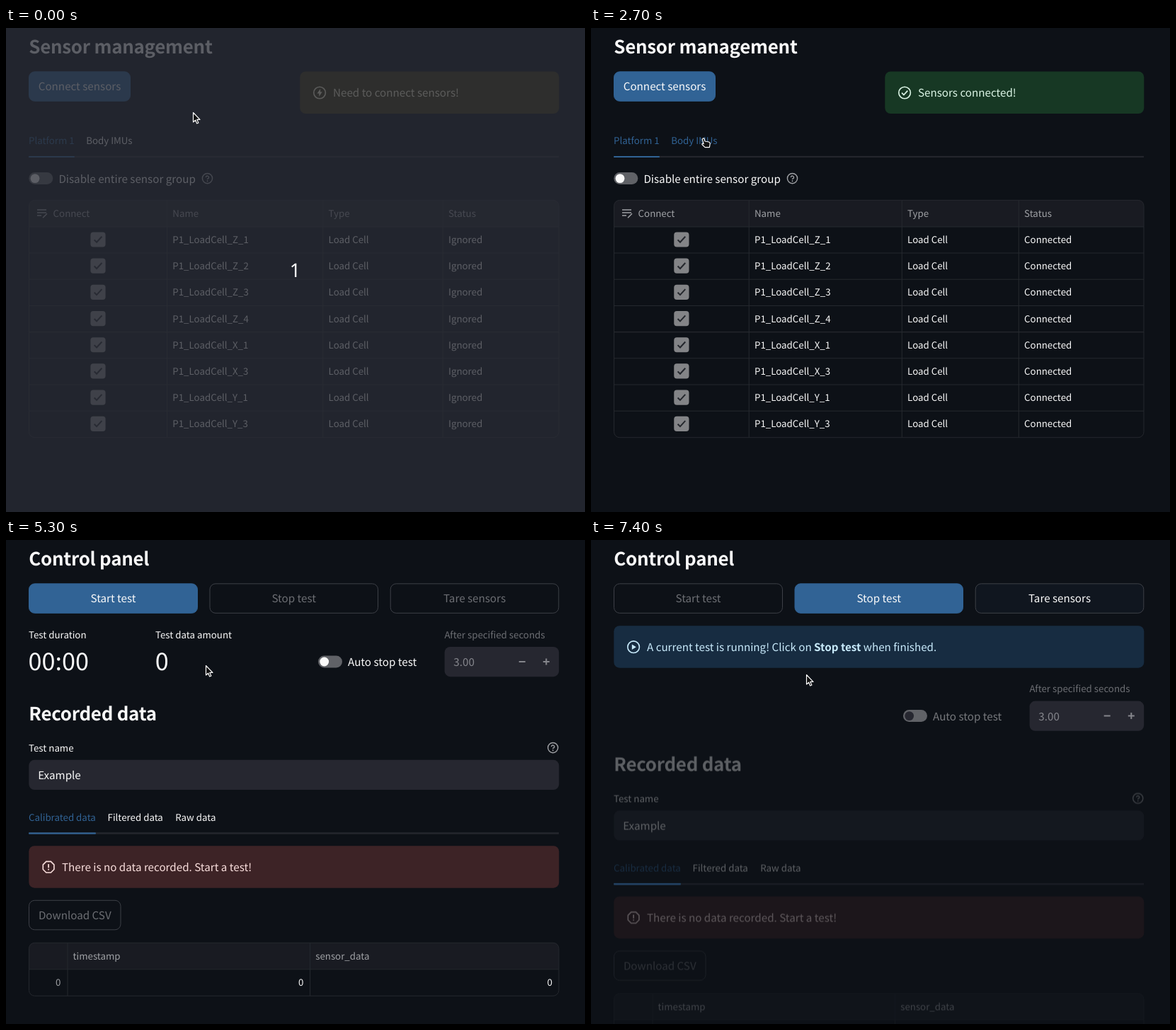
These frames come from a looping animation (818x684 px, 8 s). An HTML page:

```html
<!DOCTYPE html>
<html lang="en">
<head>
<meta charset="utf-8">
<title>Sensor management</title>
<style>
html, body { margin: 0; width: 100%; height: 100%; overflow: hidden; background: #0d1117; }
svg { display: block; width: 818px; height: 684px; }
text {
  font-family: "Noto Sans CJK JP", "Noto Sans CJK SC", "Noto Sans CJK", "Noto Sans", sans-serif;
  text-rendering: geometricPrecision;
  white-space: pre;
}
</style>
</head>
<body>
<svg id="stage" viewBox="0 0 818 684"></svg>
<script>
const LOOP = 8000, STEP = 100;
const BODY = 15.2, SMALL = 13.3;
const BG = '#0d1117', WHITE = '#fafafa', BLUE = '#316395', BLUE_HOVER = '#29547f';
const GREY = '#9fa1a5', DIM = '#6c6e73', LINE = '#25282e', EDGE = '#3d4047', FIELD = '#262730';

const text = (x, y, s, { size = BODY, fill = WHITE, anchor = 'start', more = '' } = {}) =>
  `<text x="${x}" y="${y}" font-size="${size}" fill="${fill}" text-anchor="${anchor}" ${more}>${s}</text>`;
const small = (x, y, s, fill = WHITE, anchor) => text(x, y, s, { size: SMALL, fill, anchor });
const box = (x, y, w, h, fill, { r = 8, stroke = 'none', id = '' } = {}) =>
  `<rect ${id && `id="${id}"`} x="${x}" y="${y}" width="${w}" height="${h}" rx="${r}" fill="${fill}" stroke="${stroke}"/>`;
const path = (d, color, width = 1.5) =>
  `<path d="${d}" fill="none" stroke="${color}" stroke-width="${width}"/>`;
const group = (id, body, attrs = '') => `<g id="${id}" ${attrs}>${body}</g>`;
const at = (x, y, body) => `<g transform="translate(${x} ${y})">${body}</g>`;

const heading = (y, s) =>
  text(32.3, y, s, { size: 25.9, more: 'font-weight="700" letter-spacing="-0.26"' });

function button(x, w, y, label, style = 'primary', id) {
  const [fill, stroke, color] = {
    primary: [BLUE, BLUE, WHITE],
    plain: ['#10161f', EDGE, WHITE],
    disabled: ['none', EDGE, DIM],
  }[style];
  return box(x + .5, y + .5, w - 1, 41.5, fill, { stroke, id }) +
    text(x + w / 2, y + 27, label, { fill: color, anchor: 'middle' });
}

const help = (x, y, color = GREY) => `<g transform="translate(${x} ${y}) scale(.708) translate(-12 -12)">
  <circle cx="12" cy="12" r="10" fill="none" stroke="${color}" stroke-width="2"/>
  <path d="M9.09 9a3 3 0 0 1 5.83 1c0 2-3 3-3 3M12 16.5v1.2" fill="none" stroke="${color}" stroke-width="2" stroke-linecap="round"/></g>`;

const toggle = (x, y, knob = WHITE) =>
  box(x, y - 8.5, 34, 17, '#606267', { r: 8.5 }) +
  `<circle cx="${x + 8.7}" cy="${y}" r="6.4" fill="${knob}"/>`;

const ring = c => `<circle r="8.3" fill="none" stroke="${c}" stroke-width="1.6"/>`;
const icons = {
  bolt: c => ring(c) + `<path d="M1 -5.5L-3.6 1H-.8V5.5L3.6 -1.3H1Z" fill="${c}"/>`,
  check: c => ring(c) + path('M-4 .2L-1.2 3L4.2 -2.8', c, 1.7),
  play: c => ring(c) + `<path d="M-2.3 -3.8V3.8L3.7 0Z" fill="${c}"/>`,
  error: c => path('M-3.3 -7.8H3.3L7.8 -3.3V3.3L3.3 7.8H-3.3L-7.8 3.3V-3.3Z', c, 1.6) +
    path('M0 -4.3V1M0 2.6V4.4', c, 1.7),
};
const alertBox = (x, y, w, icon, fill, color, label) =>
  box(x, y, w, 59.5, fill) + at(x + 27.8, y + 30, icons[icon](color)) +
  text(x + 46.7, y + 35.8, label, { fill: color });

function tabs(y, items, active, end, id) {
  return items.map(([x, label], i) =>
    `<g ${id ? `id="${id}${i}"` : ''} fill="${i ? WHITE : BLUE}">${text(x, y, label, { size: SMALL, fill: 'inherit' }).replace('fill="inherit"', '')}</g>`
  ).join('') + box(32, y + 16.6, 749, 2.1, '#24262d', { r: 0 }) +
    box(active, y + 16.6, end - active, 2.1, BLUE, { r: 1, id: id && id + 'Line' });
}

const ROW = 37.19;
function tableFrame(y, rows, cols) {
  const bottom = y + ROW * (rows + 1) + .6;
  let d = '';
  for (let i = 1; i <= rows; i++) d += `M32.5 ${y + .3 + i * ROW}H781`;
  for (const x of cols) d += `M${x} ${y}V${bottom}`;
  return `<path d="M32.5 ${y + ROW}V${y + 8}q0 -8 8 -8H773q8 0 8 8V${y + ROW}Z" fill="#191b22"/>` +
    path(d, LINE, 1.06) + box(32.5, y, 748.5, bottom - y, 'none', { stroke: LINE });
}

function sensorTable(id, cols, names, type, status) {
  const y = 243.4, xs = cols.map(x => x + 7.8), mid = (32.5 + cols[0]) / 2;
  let out = tableFrame(y, names.length, cols) +
    path('M44 257H57M44 261H57M44 265H50M52 268.3L58 262.3', GREY, 1.5) +
    small(66.6, 266.6, 'Connect', GREY);
  ['Name', 'Type', 'Status'].forEach((s, i) => out += small(xs[i], 266.6, s, GREY));
  names.forEach((name, i) => {
    const cy = y + ROW * (i + 1.5);
    out += box(mid - 10.6, cy - 10.8, 21.2, 21.2, '#838487', { r: 4 }) +
      at(mid, cy, path('M-5.3 .2L-1.9 3.6L5.4 -4.4', '#24272d', 2));
    [name, type, status].forEach((s, j) => out += small(xs[j], cy + 4.8, s));
  });
  return group(id, out);
}

const cells = ['Z_1', 'Z_2', 'Z_3', 'Z_4', 'X_1', 'X_3', 'Y_1', 'Y_3'].map(s => 'P1_LoadCell_' + s);

const sensorPage = group('sensorPage',
  heading(36, 'Sensor management') +
  button(32, 144, 61.3, 'Connect sensors', 'primary', 'connectBtn') +
  group('needAlert', alertBox(415.3, 61.5, 366, 'bolt', '#3c3615', '#f8efcf', 'Need to connect sensors!')) +
  group('doneAlert', alertBox(415.3, 61.5, 366, 'check', '#173824', '#dcf5e6', 'Sensors connected!')) +
  tabs(164.3, [[32, 'Platform 1'], [113.2, 'Body IMUs']], 32, 97, 'tab') +
  toggle(32.3, 212.6) + text(74.4, 218.6, 'Disable entire sensor group') + help(284.5, 212.6) +
  sensorTable('ignoredTable', [227.5, 447.8, 617.2], cells, 'Load Cell', 'Ignored') +
  sensorTable('connectedTable', [223.2, 439.3, 604.3], cells, 'Load Cell', 'Connected') +
  sensorTable('imuTable', [223.2, 439.3, 604.3], ['Body_IMU_1', 'Body_IMU_2'], 'IMU', 'Connected'));

const dataTable = tableFrame(569.3, 1, [87, 429.6]) +
  small(94.6, 592.5, 'timestamp', GREY) + small(437.2, 592.5, 'sensor_data', GREY) +
  small(77.4, 630.4, '0', GREY, 'end') + small(420.4, 630.4, '0', WHITE, 'end') +
  small(771.8, 630.4, '0', WHITE, 'end');

const controlPage = group('controlPage',
  heading(36, 'Control panel') +
  group('idle',
    button(32, 239, 61.3, 'Start test', 'primary', 'startBtn') +
    button(287.5, 238.5, 61.3, 'Stop test', 'disabled') +
    button(542.7, 238.6, 61.3, 'Tare sensors', 'disabled') +
    small(32, 138.7, 'Test duration') + small(211, 138.7, 'Test data amount') +
    text(31.6, 184.4, '00:00', { size: 34.2 }) + text(210.8, 184.4, '0', { size: 34.2 })) +
  group('running',
    button(32, 239, 61.3, 'Start test', 'disabled') +
    button(287.5, 238.5, 61.3, 'Stop test') +
    button(542.7, 238.6, 61.3, 'Tare sensors', 'plain') +
    group('runAlert', alertBox(32.3, 121.2, 749, 'play', '#172c41', '#c9ebfc',
      'A current test is running! Click on <tspan font-weight="700">Stop test</tspan> when finished.'))) +
  group('autoStop',
    group('toggleOn', toggle(441, 172) + text(483, 178, 'Auto stop test')) +
    group('toggleOff', toggle(441, 172, FIELD) + text(483, 178, 'Auto stop test', { fill: '#76787c' })) +
    small(619.4, 138.5, 'After specified seconds', DIM) +
    box(619.6, 151, 161.6, 42.2, FIELD) + text(632.3, 178, '3.00', { fill: '#85868c' }) +
    path('M724.7 172H733.7M758.8 172H767.8M763.3 167.5V176.5', '#85868c', 2)) +
  group('recorded',
    group('stale',
      heading(255.4, 'Recorded data') +
      small(32, 298.8, 'Test name') + help(772.7, 293.6) +
      box(32.3, 310.8, 749, 42.2, FIELD) + text(45.2, 338, 'Example') +
      tabs(396.8, [[32, 'Calibrated data'], [143.6, 'Filtered data'], [239.2, 'Raw data']], 32, 127) +
      alertBox(32.3, 432.2, 749, 'error', '#3d2326', '#fadfdd', 'There is no data recorded. Start a test!') +
      button(32, 130.5, 508.8, 'Download CSV', 'disabled') + dataTable) +
    group('tabRule', box(32, 413.4, 749, 2.1, '#24262d', { r: 0 }) + box(32, 413.4, 95, 2.1, BLUE, { r: 1 }))));

const shape = (d, more = '') => `<path d="${d}" fill="#111" stroke="#fff" stroke-width="1.15" stroke-linejoin="round" ${more}/>`;
const pointer = group('pointer',
  group('arrow', shape('M.5 .5V14L3.6 11.2L5.7 16L7.9 15L5.8 10.4H10Z')) +
  group('hand', shape('M1.2 2.2Q2.6 -.2 4.2 1.8L4.8 5L10.4 6Q12.2 6.6 12.2 8.4L11.4 13.6H5L1.2 10Q0 8.4 2 8.2L3.2 8.8Z')) +
  group('blocked', '<circle r="6.7" fill="#111" stroke="#fff" stroke-width="1.1"/>' +
    '<circle r="3.8" fill="none" stroke="#fff" stroke-width="1.3"/>' + path('M-2.7 2.7L2.7 -2.7', '#fff', 1.4)));

const stage = document.getElementById('stage');
stage.innerHTML = box(0, 0, 818, 684, BG, { r: 0 }) + sensorPage + controlPage +
  group('countdown', box(0, 0, 818, 684, '#2a2c35', { r: 0 }).replace('/>', ' opacity=".757"/>') +
    '<text x="408.5" y="351.5" font-size="27" fill="#fff" text-anchor="middle" style="font-family:\'Noto Sans\',sans-serif">1</text>') +
  pointer;

const el = {};
stage.querySelectorAll('[id]').forEach(n => el[n.id] = n);
const show = (id, on) => { el[id].style.display = on ? '' : 'none'; };
const fill = (id, color) => el[id].setAttribute('fill', color);

// time, x, y, cursor shape
const moves = [
  [0, 264, 119, 'arrow'], [100, 264, 119, 'arrow'], [600, 171, 92, 'hand'], [800, 161, 85, 'hand'],
  [1200, 161, 85, 'hand'], [1400, 160, 108, 'arrow'], [1800, 157, 148, 'arrow'], [2100, 156, 155, 'hand'],
  [3400, 156, 155, 'hand'], [4300, 300, 222, 'arrow'], [4800, 282, 177, 'arrow'], [5300, 282, 177, 'arrow'],
  [5600, 168, 97, 'hand'], [5800, 168.5, 97, 'blocked'], [6100, 168.5, 97, 'blocked'],
  [6300, 205, 122, 'arrow'], [6800, 298, 184, 'arrow'], [7200, 304, 190, 'arrow'], [LOOP, 304, 190, 'arrow'],
];
const ramp = (t, a, b) => Math.min(1, Math.max(0, (t - a) / (b - a)));

function draw(t) {
  const onSensors = t < 3400, onControl = t >= 4300, running = t >= 5800;
  show('countdown', t < 100);
  show('sensorPage', onSensors);
  show('controlPage', onControl);

  const connected = t >= 1500, filled = t >= 1900, imus = t >= 2900;
  show('needAlert', !connected);
  show('doneAlert', connected);
  show('ignoredTable', !filled);
  show('connectedTable', filled && !imus);
  show('imuTable', imus);
  fill('connectBtn', t >= 600 && t < 1400 ? BLUE_HOVER : BLUE);
  fill('tab0', imus ? WHITE : BLUE);
  fill('tab1', t >= 2100 ? BLUE : WHITE);
  const slide = ramp(t, 2800, 3100);
  el.tabLine.setAttribute('x', 32 + 81.6 * slide);
  el.tabLine.setAttribute('width', 65 + slide);

  show('idle', !running);
  show('running', running);
  show('toggleOn', !running);
  show('toggleOff', running);
  fill('startBtn', t >= 5600 ? BLUE_HOVER : BLUE);
  el.autoStop.setAttribute('transform', `translate(0 ${running ? 76.6 : 0})`);
  el.recorded.setAttribute('transform', `translate(0 ${running ? 71.5 : 0})`);
  el.runAlert.setAttribute('opacity', ramp(t, 5900, 6600));
  const fade = ramp(t, 6400, 7400) ** 1.7;
  el.stale.setAttribute('opacity', 1 - .66 * fade);
  el.tabRule.setAttribute('opacity', 1 - .4 * fade);

  const i = moves.findLastIndex(m => m[0] <= t);
  const [t0, x0, y0, kind] = moves[i], [t1, x1, y1] = moves[i + 1];
  const k = ramp(t, t0, t1);
  el.pointer.setAttribute('transform', `translate(${x0 + (x1 - x0) * k} ${y0 + (y1 - y0) * k})`);
  show('pointer', onSensors || onControl);
  for (const id of ['arrow', 'hand', 'blocked']) show(id, id === kind);
}

const start = performance.now();
function tick() {
  const t = (performance.now() - start) % LOOP;
  draw(Math.floor(t / STEP) * STEP);
  requestAnimationFrame(tick);
}
tick();
</script>
</body>
</html>
```
